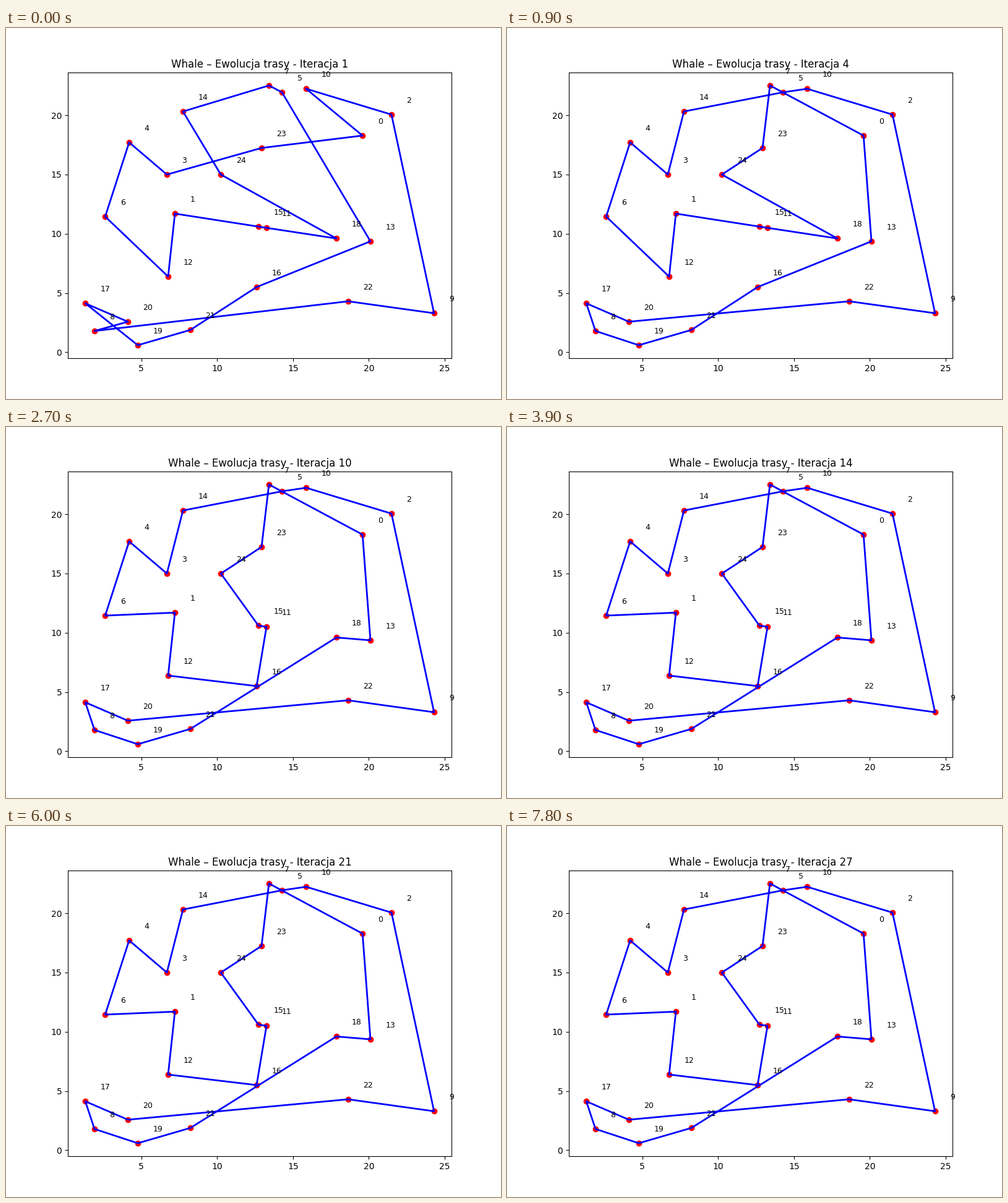
A matplotlib script that plays this animation: 800x600 px, repeating every 8000 ms.

```python
import numpy as np
import matplotlib.pyplot as plt
from matplotlib.animation import FuncAnimation

WIDTH, HEIGHT, DPI = 800, 600, 100
FRAME_MS, LOOP_MS, ITERATION_MS = 100, 8000, 300
X_LIM = (0.163, 25.447)
Y_LIM = (-0.506, 23.607)

# City positions in stage pixels, indexed by city number.
CITY_PIXELS = np.array([
    (576.2, 174), (273, 300.2), (623, 140), (260, 237), (199, 185),
    (446, 104), (160.3, 305), (425, 93), (143, 490), (691.8, 461.3),
    (485, 98.3), (421, 323.2), (262, 402), (589, 345), (286, 135),
    (408, 321.2), (405, 419), (128.2, 445.3), (534, 340.4), (213, 513),
    (197, 475), (298, 488.3), (553, 442), (413, 194), (347.2, 237),
])

# Best tour, keyed by the iteration at which it is found.
TOURS = {
    1: [7, 14, 24, 18, 11, 15, 1, 12, 6, 4, 3, 23, 0, 10, 2, 9, 22, 8, 20,
        17, 19, 21, 16, 13, 5],
    3: [14, 5, 10, 2, 9, 22, 20, 17, 8, 19, 21, 16, 13, 0, 7, 23, 24, 18,
        11, 15, 1, 12, 6, 4, 3],
    6: [14, 5, 10, 2, 9, 22, 20, 17, 8, 19, 21, 18, 13, 0, 7, 23, 24, 15,
        11, 16, 12, 1, 6, 4, 3],
}

plt.rcParams["font.family"] = "DejaVu Sans"
fig = plt.figure(figsize=(WIDTH / DPI, HEIGHT / DPI), dpi=DPI)
ax = fig.add_axes([0.125, 0.11, 0.775, 0.77])
ax.set(xlim=X_LIM, ylim=Y_LIM,
       xticks=range(5, 26, 5), yticks=range(0, 21, 5))

stage_points = np.column_stack([CITY_PIXELS[:, 0], HEIGHT - CITY_PIXELS[:, 1]])
cities = ax.transData.inverted().transform(stage_points)

ax.scatter(*cities.T, c="red")
route, = ax.plot([], [], "b-", lw=2, solid_capstyle="round")
title = ax.set_title("")
for number, (x, y) in enumerate(cities):
    ax.text(x + 1, y + 1, str(number), fontsize=9)


def update(frame):
    iteration = frame * FRAME_MS // ITERATION_MS + 1
    tour = TOURS[max(start for start in TOURS if start <= iteration)]
    route.set_data(*cities[tour + tour[:1]].T)
    title.set_text(f"Whale – Ewolucja trasy - Iteracja {iteration}")
    return route, title


animation = FuncAnimation(fig, update, frames=LOOP_MS // FRAME_MS,
                          interval=FRAME_MS, repeat=True, repeat_delay=0)
plt.show()
```
